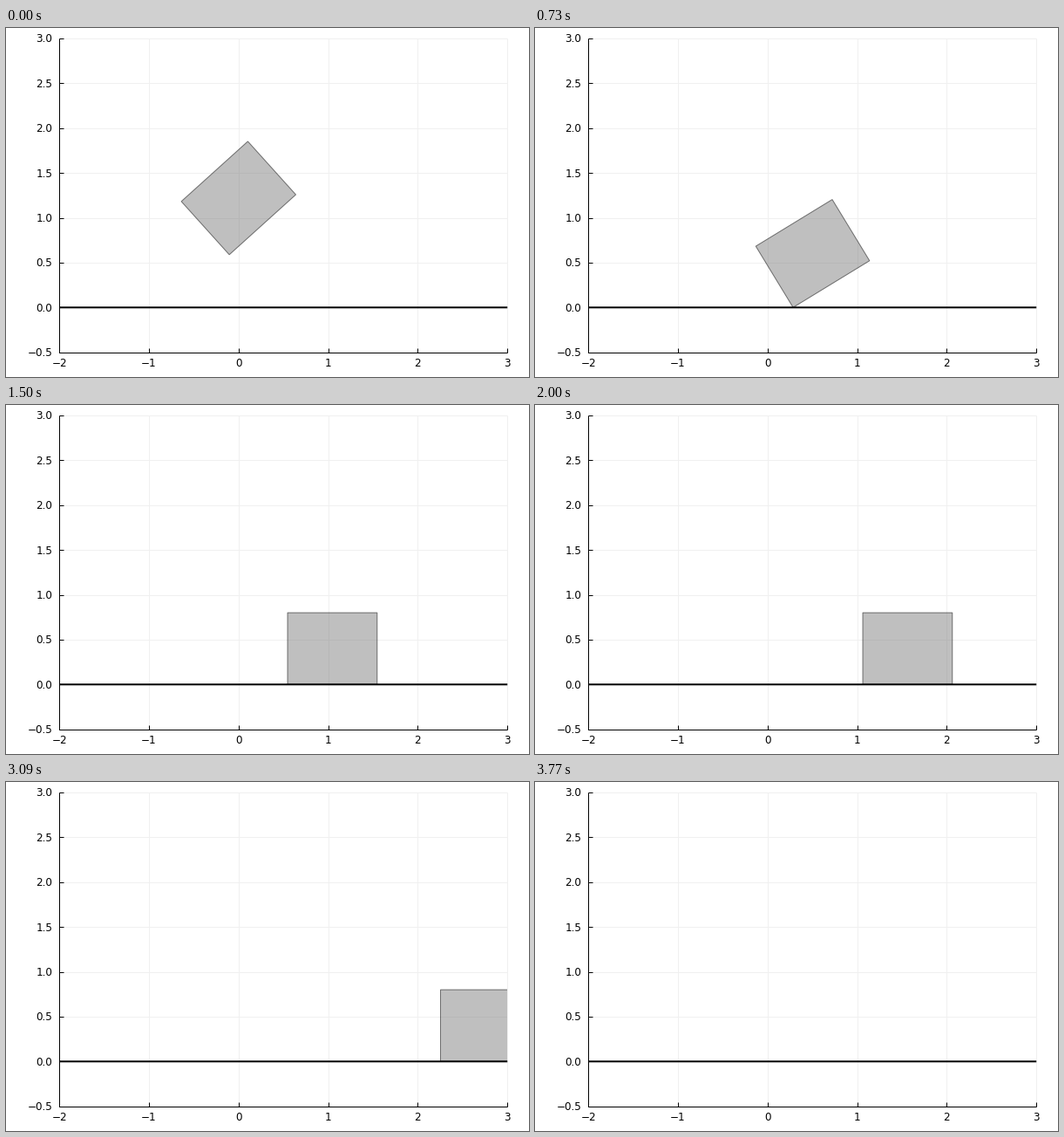
These frames come from a looping animation (600x400 px, 4.1 s). A matplotlib script:

```python
import numpy as np
import matplotlib.pyplot as plt
from matplotlib.animation import FuncAnimation
from matplotlib.patches import Polygon, Rectangle

W, H, DPI = 600, 400, 100
LEFT, RIGHT, TOP, BOTTOM = 61.2, 575.2, 11.9, 371.7
UNIT = (RIGHT - LEFT) / 5
GROUND = BOTTOM - 0.5 * UNIT
LOOP, INTERVAL = 4100, 20
STEP = 1000 / 22          # simulation steps shown per second: 22

# Steps at which the motion changes its kind
HIT, LAND, SLIDE, CRUISE = 12, 21, 22, 33
PIVOT = 296.1             # resting place of the corner that hits the ground
START_ANGLE, HIT_ANGLE = 42.05, 53.5


def px(points):
    return points * 72 / DPI


def sx(x):
    return LEFT + (x + 2) * UNIT


def sy(y):
    return GROUND - y * UNIT


def box(corner, angle):
    """Corners of the 1 x 0.8 box, given its lower left corner on the stage."""
    a = np.radians(angle)
    along = UNIT * np.array([np.cos(a), -np.sin(a)])
    up = 0.8 * UNIT * np.array([-np.sin(a), -np.cos(a)])
    c = np.asarray(corner, float)
    return np.array([c, c + along, c + along + up, c + up])


def centre_offset(angle):
    return box((0, 0), angle).mean(axis=0)


def pose(k):
    if k < HIT:
        s = k / HIT
        angle = START_ANGLE + (HIT_ANGLE - START_ANGLE) * s
        end = np.array([PIVOT, GROUND]) + centre_offset(HIT_ANGLE)
        start = np.array([sx(0), sy(1.22)])
        centre = start + (end - start) * np.array([s, s * s])
        return box(centre - centre_offset(angle), angle)
    if k < LAND:
        n = k - HIT
        return box((PIVOT, GROUND), HIT_ANGLE - 5.19 * n - 0.084 * n * n)
    if k < CRUISE:
        x = PIVOT + 0.223 * max(k - SLIDE, 0) ** 2
    else:
        x = np.interp(k, [33, 36, 44, 56, 68, 83, 92],
                      [323, 337, 376, 437, 498.5, 576.5, 623])
    return box((x, GROUND), 0)


fig = plt.figure(figsize=(W / DPI, H / DPI), dpi=DPI, facecolor="white")
ax = fig.add_axes([0, 0, 1, 1])
ax.set_xlim(0, W)
ax.set_ylim(H, 0)
ax.axis("off")


def line(x, y, width=1.0, color="black", z=4, **kw):
    ax.plot(x, y, color=color, lw=px(width), zorder=z,
            solid_capstyle="butt", **kw)


for v in range(-2, 4):
    x = sx(v)
    if v > -2:
        line([x, x], [TOP, BOTTOM], color="#f0f0f0", z=1)
    line([x, x], [BOTTOM, BOTTOM - 5])
    ax.text(x, 387.6, str(v).replace("-", "\u2212"), fontsize=px(12),
            family="DejaVu Sans", ha="center", va="baseline")

for v in np.arange(-0.5, 3.1, 0.5):
    y = sy(v)
    if v > -0.5:
        line([LEFT, RIGHT], [y, y], color="#f0f0f0", z=1)
    line([LEFT, LEFT + 5], [y, y])
    ax.text(53.2, y + 4.4, f"{v:.1f}".replace("-", "\u2212"), fontsize=px(12),
            family="DejaVu Sans", ha="right", va="baseline")

line([LEFT, LEFT], [TOP, BOTTOM])
line([LEFT, RIGHT], [BOTTOM, BOTTOM])
line([LEFT, RIGHT], [GROUND, GROUND], width=2, z=3, snap=False)

window = Rectangle((LEFT, TOP), RIGHT - LEFT, BOTTOM - TOP,
                   transform=ax.transData)
block = Polygon(pose(0), closed=True, facecolor=(0.5, 0.5, 0.5, 0.5),
                edgecolor=(0, 0, 0, 0.5), lw=px(1), zorder=2, snap=False)
ax.add_patch(block)
block.set_clip_path(window)


def update(i):
    time = (i + 0.5) * INTERVAL
    block.set_xy(pose(int((time + 5) / STEP)))
    return (block,)


anim = FuncAnimation(fig, update, frames=LOOP // INTERVAL, interval=INTERVAL,
                     repeat=True, repeat_delay=0, blit=False)
plt.show()
```
